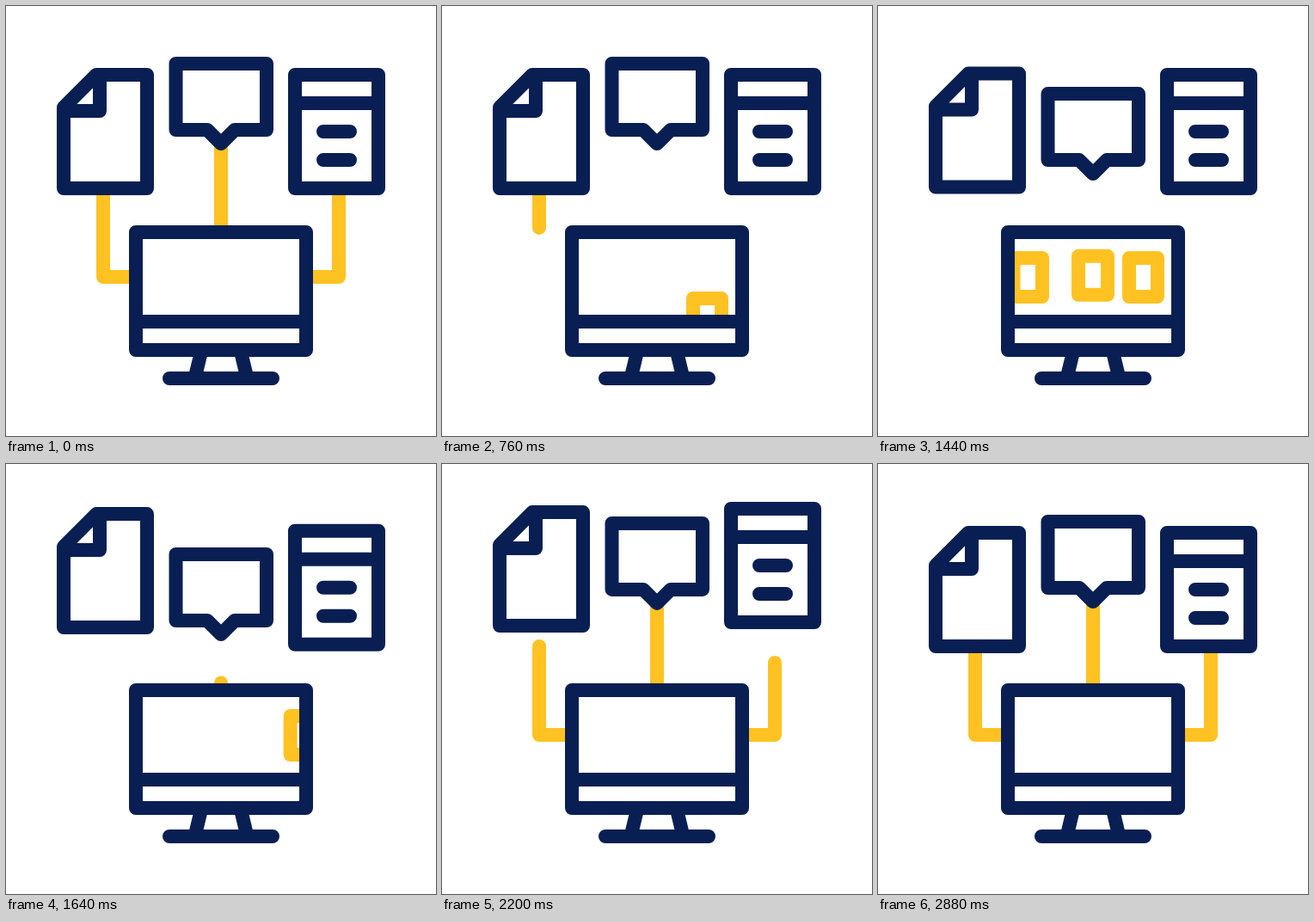
An HTML page for the animation above (3000 ms loop, 500 by 500 pixels).

```html
<!DOCTYPE html>
<html lang="en">
<head>
<meta charset="utf-8">
<title>Connected computer</title>
<style>
  html, body { margin: 0; width: 100%; height: 100%; overflow: hidden; background: #fff; }
  svg { display: block; width: 100vw; height: 100vh; }
  path { fill: none; stroke: #091f53; stroke-width: 16; stroke-linecap: round; stroke-linejoin: round; }
  .accent path, path.accent { stroke: #ffc222; }
</style>
</head>
<body>
<svg viewBox="0 0 500 500">
  <clipPath id="screen"><rect x="151" y="263" width="198" height="104"/></clipPath>

  <g class="accent">
    <path id="wireL" d="M151 315H113V212"/>
    <path id="wireC" d="M250 263V160"/>
    <path id="wireR" d="M349 315H387V212"/>
  </g>

  <g class="accent" clip-path="url(#screen)">
    <path id="boxL" d="M175 293H208.5V338H175Z"/>
    <path id="boxC" d="M233 293H267V338H233Z"/>
    <path id="boxR" d="M292 293H325V338H292Z"/>
  </g>

  <path d="M151 263H349V400H151ZM151 367H349M226 406L220 431M274 406L280 431M190 433H310"/>

  <path id="doc" d="M105 80H164V212H67V118ZM109 80V122H67"/>
  <path id="bubble" d="M197.5 67H303V144H266L250 160L234 144H197.5Z"/>
  <path id="card" d="M336 80H433V212H336ZM336 113H433M369 146H400M369 179H400"/>
</svg>
<script>
const LOOP = 3000, STEP = 40, SPEED = 0.283;
const $ = id => document.getElementById(id);
const clamp = x => Math.min(1, Math.max(0, x));
const ease = (t, start, dur) => (1 - Math.cos(Math.PI * clamp((t - start) / dur))) / 2;

// Vertical hops: distance, start and duration out, start and duration back
const hops = [
  { id: 'doc', dy: -40, out: [1380, 490], back: [1990, 480] },
  { id: 'bubble', dy: 38, out: [1054, 470], back: [1790, 480] },
  { id: 'card', dy: -28, out: [1552, 480], back: [2360, 500] }
];

// Wires retract from the monitor, then grow out of it again
const wires = [
  { id: 'wireL', shrink: 424, grow: 1688 },
  { id: 'wireC', shrink: 342, grow: 1610 },
  { id: 'wireR', shrink: 257, grow: 1769 }
].map(w => ({ ...w, el: $(w.id), len: $(w.id).getTotalLength() }));

// Boxes rise into the screen and leave towards their wire
const boxes = [
  { id: 'boxL', enter: 780, leave: 1340, dx: -70, dy: 0 },
  { id: 'boxC', enter: 700, leave: 1410, dx: 0, dy: -90 },
  { id: 'boxR', enter: 620, leave: 1480, dx: 70, dy: 0 }
];

const move = (id, x, y) => $(id).setAttribute('transform', `translate(${x} ${y})`);

function drawWire({ el, len, shrink, grow }, t, limit) {
  const growing = t >= grow;
  const from = growing ? 0 : Math.max(0, (t - shrink) * SPEED);
  const to = growing ? Math.min(limit, (t - grow) * SPEED) : len;
  el.style.display = to > from ? '' : 'none';
  el.style.strokeDasharray = `${Math.max(0, to - from)} 999`;
  el.style.strokeDashoffset = -from;
}

function draw(t) {
  const offset = {};
  for (const { id, dy, out, back } of hops) {
    offset[id] = dy * (ease(t, ...out) - ease(t, ...back));
    move(id, 0, offset[id]);
  }
  for (const w of wires) {
    drawWire(w, t, w.id === 'wireC' ? w.len - offset.bubble : w.len);
  }
  for (const { id, enter, leave, dx, dy } of boxes) {
    const gone = ease(t, leave, 300);
    const below = 85 * (1 - ease(t, enter, 300));
    $(id).style.display = t > enter && gone < 1 ? '' : 'none';
    move(id, dx * gone, dy * gone + below);
  }
}

let begin;
function tick(now) {
  begin ??= now;
  const t = (now - begin) % LOOP;
  draw(Math.floor(t / STEP) * STEP);
  requestAnimationFrame(tick);
}
draw(0);
requestAnimationFrame(tick);
</script>
</body>
</html>
```
